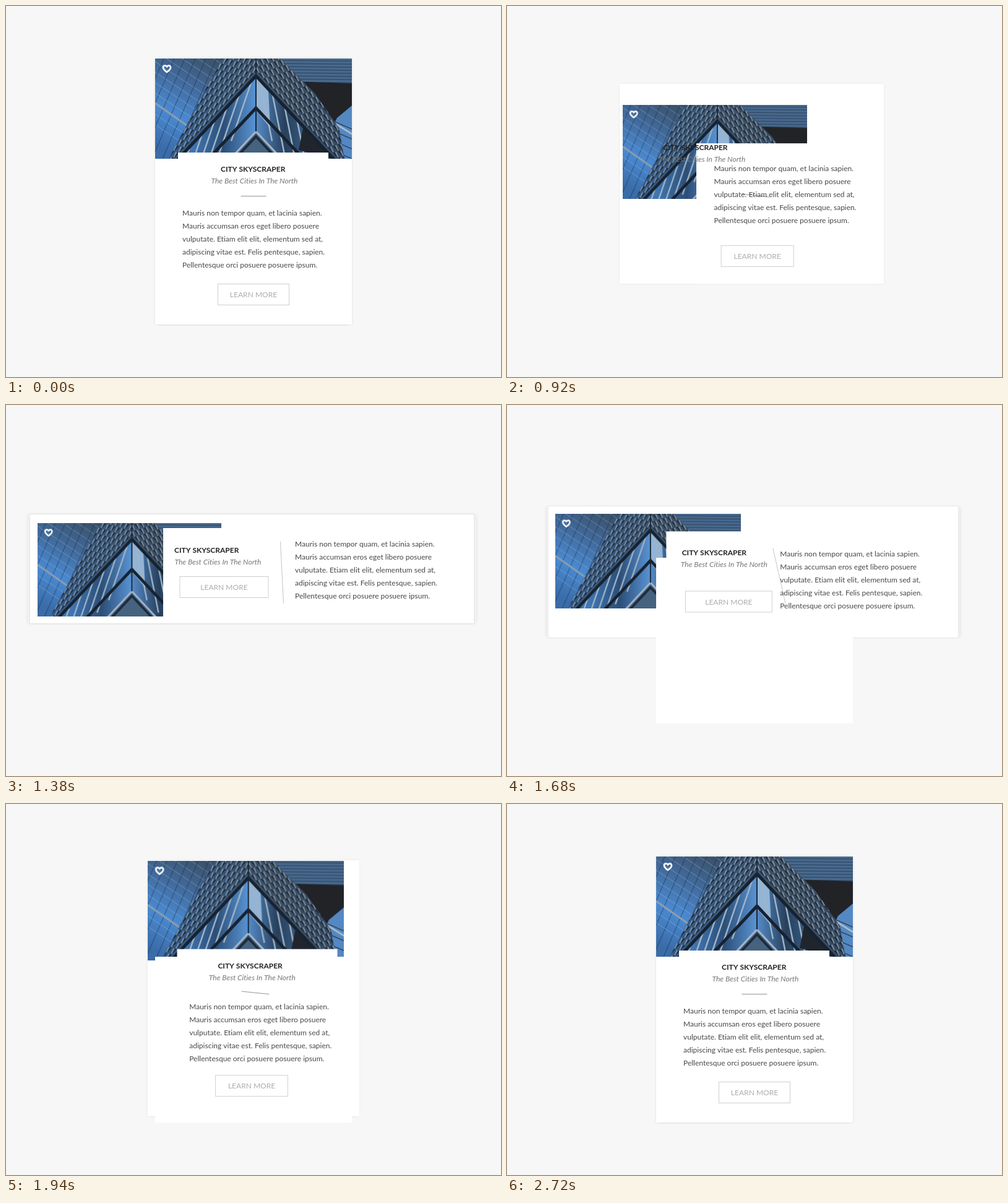
An HTML page with a canvas for the animation above (2740 ms loop, 800 by 600 pixels).

```html
<!DOCTYPE html>
<html lang="en">
<head>
<meta charset="utf-8">
<title>Card layout transition</title>
<style>
  html, body { margin: 0; width: 100%; height: 100%; overflow: hidden; background: #f7f7f7; }
  canvas { display: block; width: 800px; height: 600px; }
</style>
</head>
<body>
<canvas id="stage" width="800" height="600"></canvas>
<script>
const ctx = document.getElementById('stage').getContext('2d');
const LOOP = 2740, RETURN_START = 1660, RETURN_LENGTH = 560;
const PHOTO_W = 318, PHOTO_H = 162;
const FONT = '12px Lato, sans-serif';
const PARAGRAPH = [
  'Mauris non tempor quam, et lacinia sapien.',
  'Mauris accumsan eros eget libero posuere',
  'vulputate. Etiam elit elit, elementum sed at,',
  'adipiscing vitae est. Felis pentesque, sapien.',
  'Pellentesque orci posuere posuere ipsum.'
];

// Each track holds one value per key time, from the tall card to the wide card.
const KEY_TIMES = [600, 720, 1180, 1380, 1440];
const TRACKS = {
  left: [241, 232, 93, 39, 38],
  top: [85, 94, 166, 177, 177],
  right: [559, 566, 693, 756, 757],
  bottom: [515, 500, 380, 353, 353],
  photoX: [241, 229, 114, 51, 51],
  photoY: [85, 102, 216, 191, 191],
  photoScale: [1, .987, .889, .935, .935],
  panelLeft: [278, 287, 322, 254, 254],
  panelTop: [237, 230, 212, 199, 199],
  panelRight: [521, 534, 693, 756, 757],
  titleX: [347, 323, 186, 272, 272],
  titleY: [268, 259, 208, 239, 239],
  subX: [331.5, 309.5, 186, 272.5, 272.5],
  subY: [287, 278, 227, 258, 258],
  textX: [285, 296, 403, 467, 467],
  textY: [339, 323, 212, 229, 229],
  buttonX: [342, 346, 344, 280.5, 279],
  buttonY: [449, 435, 315, 277, 276],
  buttonW: [116, 116, 125, 144, 145],
  ruleX: [400, 399.5, 411.5, 446, 446.5],
  ruleY: [307.5, 308.5, 299, 271, 271],
  ruleAngle: [0, 0, 27.8, 87, 90],
  ruleLength: [41, 41, 60, 100, 100]
};

// Monotone cubic interpolation, at rest at both ends.
function sample(values, t) {
  const last = KEY_TIMES.length - 1;
  if (t <= KEY_TIMES[0]) return values[0];
  if (t >= KEY_TIMES[last]) return values[last];
  const chord = i => (values[i + 1] - values[i]) / (KEY_TIMES[i + 1] - KEY_TIMES[i]);
  const slope = i => {
    if (i === 0 || i === last) return 0;
    const a = chord(i - 1), b = chord(i);
    return a * b > 0 ? 2 * a * b / (a + b) : 0;
  };
  const i = KEY_TIMES.findIndex(k => k > t) - 1;
  const h = KEY_TIMES[i + 1] - KEY_TIMES[i];
  const p = (t - KEY_TIMES[i]) / h, q = 1 - p;
  return values[i] * (1 + 2 * p) * q * q + values[i + 1] * p * p * (3 - 2 * p)
    + h * p * q * (slope(i) * q - slope(i + 1) * p);
}

function poseAt(t) {
  const p = Math.min(1, Math.max(0, (t - RETURN_START) / RETURN_LENGTH));
  const remaining = (1 - p) ** 4;
  const pose = {};
  for (const [name, values] of Object.entries(TRACKS)) {
    pose[name] = p > 0
      ? values[0] + (values[values.length - 1] - values[0]) * remaining
      : sample(values, t);
  }
  return pose;
}

function makePhoto() {
  const canvas = document.createElement('canvas');
  canvas.width = PHOTO_W;
  canvas.height = PHOTO_H;
  const g = canvas.getContext('2d');

  const trace = points => {
    g.beginPath();
    points.forEach(([x, y]) => g.lineTo(x, y));
  };
  const fill = (color, ...points) => { trace(points); g.closePath(); g.fillStyle = color; g.fill(); };
  const stroke = (color, width, ...points) => {
    trace(points);
    g.strokeStyle = color;
    g.lineWidth = width;
    g.stroke();
  };
  const gradient = (x0, y0, x1, y1, ...colors) => {
    const paint = g.createLinearGradient(x0, y0, x1, y1);
    colors.forEach((c, i) => paint.addColorStop(i / (colors.length - 1), c));
    return paint;
  };
  const clip = (...points) => { g.save(); trace(points); g.closePath(); g.clip(); };

  // Neighbouring glass facades
  g.fillStyle = gradient(100, 0, 20, 150, '#3a5068', '#41699a', '#4a8ad2', '#3a6ca8');
  g.fillRect(0, 0, PHOTO_W, PHOTO_H);
  for (let i = 0; i < 12; i++) {
    stroke('rgba(24,40,60,.45)', 1.2, [i * 17 - 20, 0], [i * 17 - 90, 162]);
    stroke('rgba(185,200,214,.4)', 1, [0, i * 17 - 80], [120, i * 17]);
  }
  stroke('#8e9dab', 3, [0, 72], [58, 113]);
  fill('#48698d', [195, 0], [318, 0], [318, 42], [220, 40]);
  for (let y = 3; y < 40; y += 5) stroke('rgba(28,46,70,.5)', 1.5, [195, y], [318, y + 1]);
  fill('#212327', [222, 37], [318, 40], [318, 78], [294, 96], [270, 150], [225, 145]);
  fill('#5488c2', [294, 96], [318, 76], [318, 162], [262, 162]);
  for (let y = 90; y < 170; y += 16) stroke('#2d4560', 1.5, [262, y], [318, y + 24]);
  stroke('#a9b9c7', 3, [283, 100], [318, 122]);

  // Tower with rows of slats falling away from the corner
  const corner = 163, fall = 1.07;
  clip([108, 0], [202, 0], [258, 56], [297, 112], [306, 162], [22, 162]);
  g.fillStyle = gradient(22, 0, 310, 0, '#345a88', '#3a5878', '#3d4f62', '#344a64');
  g.fillRect(0, 0, PHOTO_W, PHOTO_H);
  for (const side of [-1, 1]) {
    for (let k = -180; k < 24; k += 11) {
      stroke('rgba(18,28,42,.65)', 2.5, [corner, k], [corner + side * 170, k + 170 * fall]);
      for (let u = 5; u < 155; u += 8) {
        const x = corner + side * u, y = k + u * fall;
        stroke('rgba(178,192,205,.6)', 2, [x, y], [x - side * 4, y - 9]);
      }
    }
  }

  // Large panes below the main edge
  clip([corner, 27], [corner + 130, 166], [corner - 130, 166]);
  g.fillStyle = gradient(60, 0, 260, 0, '#3f76b2', '#2c4f78', '#5790cf', '#28405c', '#3c6794');
  g.fillRect(0, 0, PHOTO_W, PHOTO_H);
  fill('#92b4d6', [corner, 30], [corner + 20, 52], [corner + 23, 112], [corner, 84]);
  for (const side of [-1, 1]) {
    for (let u = 6; u < 126; u += 20) {
      const x = corner + side * u, y = 27 + u * fall;
      const foot = side < 0 ? -34 : 20;
      stroke('#a0b4c6', 2.5, [x, y], [x + foot, y + 100]);
    }
  }
  fill('#20252d', [240, 108], [262, 128], [285, 162], [232, 148]);
  g.restore();
  const chevron = (color, width, y) => stroke(color, width,
    [corner - 130, y + 130 * fall], [corner, y], [corner + 130, y + 130 * fall]);
  chevron('#172230', 5, 28);
  chevron('#172230', 5, 80);
  fill('#45627f', [corner, 118], [corner + 45, 166], [corner - 45, 166]);
  chevron('#a6b6c5', 3, 118);
  chevron('#1c2b3c', 4, 126);
  stroke('#1a2838', 2, [corner, 0], [corner, 118]);
  g.restore();

  // Favourite icon
  g.translate(19, 16.5);
  g.beginPath();
  g.moveTo(0, 5.4);
  g.bezierCurveTo(-4, 2.4, -6, .6, -6, -1.8);
  g.bezierCurveTo(-6, -5.8, -1.4, -6.2, 0, -3);
  g.bezierCurveTo(1.4, -6.2, 6, -5.8, 6, -1.8);
  g.bezierCurveTo(6, .6, 4, 2.4, 0, 5.4);
  g.closePath();
  g.strokeStyle = '#fff';
  g.lineWidth = 2.6;
  g.lineJoin = 'round';
  g.stroke();
  return canvas;
}

const photo = makePhoto();

function rect(color, left, top, right, bottom) {
  ctx.fillStyle = color;
  ctx.fillRect(left, top, right - left, bottom - top);
}

function text(string, x, y, color, style = '') {
  ctx.font = `${style} ${FONT}`;
  ctx.letterSpacing = '0.01px'; // any spacing turns ligatures off
  ctx.fillStyle = color;
  ctx.fillText(string, x, y);
}

function drawCard(p) {
  const spread = (p.right - p.left - 318) / 400 * 9 - 5;
  ctx.save();
  ctx.shadowColor = 'rgba(0,0,0,.12)';
  ctx.shadowBlur = 5;
  rect('#f1f1f1', p.left - spread, p.top + 1, p.right + spread, p.bottom - 1);
  ctx.shadowBlur = 3;
  rect('#fff', p.left, p.top, p.right, p.bottom);
  ctx.restore();
}

function drawRule(p) {
  ctx.save();
  ctx.translate(p.ruleX, p.ruleY);
  ctx.rotate(p.ruleAngle * Math.PI / 180);
  ctx.fillStyle = p.ruleAngle > 60 ? '#c4c4c4' : '#969696';
  ctx.fillRect(-p.ruleLength / 2, -.5, p.ruleLength, 1);
  ctx.restore();
}

function drawButton(p) {
  ctx.strokeStyle = '#cfcfcf';
  ctx.lineWidth = 1;
  ctx.strokeRect(p.buttonX + .5, p.buttonY + .5, p.buttonW - 1, 34);
  ctx.textAlign = 'center';
  text('LEARN MORE', p.buttonX + p.buttonW / 2, p.buttonY + 22, '#adadad');
  ctx.textAlign = 'left';
}

function draw(t) {
  const p = poseAt(t);
  rect('#f7f7f7', 0, 0, 800, 600);
  drawCard(p);
  ctx.drawImage(photo, p.photoX, p.photoY, PHOTO_W * p.photoScale, PHOTO_H * p.photoScale);
  if (t > RETURN_START) rect('#fff', 241, 247, 559, 515);
  rect('#fff', p.panelLeft, p.panelTop, p.panelRight, p.bottom);
  text('CITY SKYSCRAPER', p.titleX, p.titleY, '#222', 'bold');
  text('The Best Cities In The North', p.subX, p.subY, '#777', 'italic');
  drawRule(p);
  PARAGRAPH.forEach((line, i) => text(line, p.textX, p.textY + i * 21, '#484848'));
  drawButton(p);
}

const start = performance.now();
function tick() {
  draw((performance.now() - start) % LOOP);
  requestAnimationFrame(tick);
}
tick();
</script>
</body>
</html>
```
